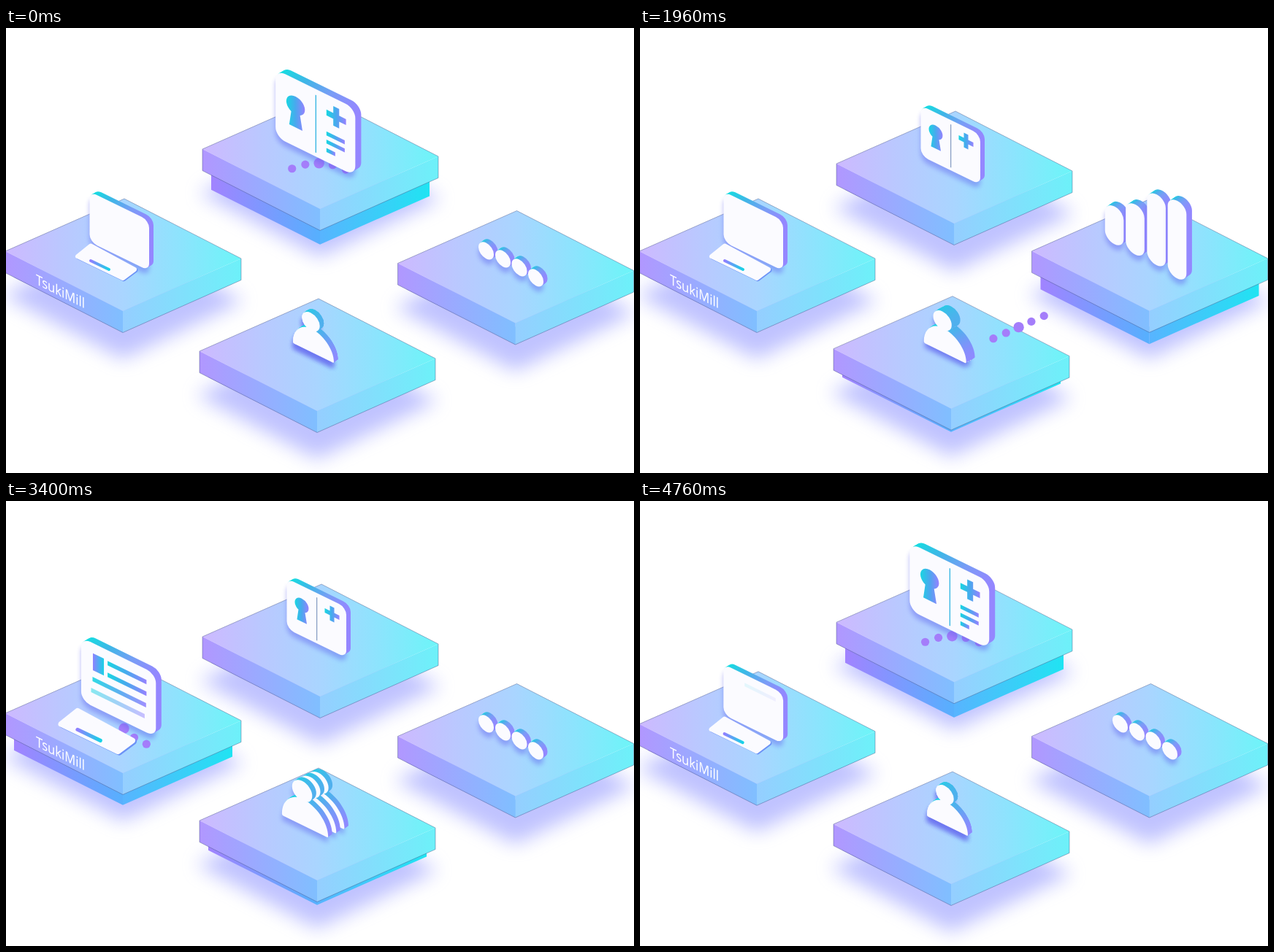
An HTML page that plays this animation: 860x610 px, repeating every 4800 ms.

```html
<!DOCTYPE html>
<html lang="en">
<head>
<meta charset="utf-8">
<title>Isometric data loop</title>
<style>
html, body { margin: 0; width: 100%; height: 100%; overflow: hidden; background: #fff; }
svg { display: block; width: 100%; height: 100%; }
text { font: 500 19.2px "Noto Sans", "Open Sans", sans-serif; fill: #fff; }
</style>
</head>
<body>
<svg viewBox="0 0 860 610">
  <defs id="defs">
    <filter id="haze" x="-30%" y="-40%" width="160%" height="180%"><feGaussianBlur stdDeviation="13"/></filter>
    <filter id="soft" x="-50%" y="-50%" width="200%" height="200%"><feGaussianBlur stdDeviation="3"/></filter>
  </defs>
  <g id="hazes"></g>
  <g id="scene"></g>
</svg>
<script>
const LOOP = 4800, STEP = 600, LIFT = 20, SHEAR = 0.49, WHITE = '#fbfbff';
const $ = id => document.getElementById(id);
const clamp = x => Math.max(0, Math.min(1, x));
const ease = x => (1 - Math.cos(Math.PI * clamp(x))) / 2;
const mix = (a, b, p) => a + (b - a) * p;

const gradients = {
  top: ['#cdb9ff', '#bac8ff', '#a9d5ff', '#8ce4fd', '#6cf5f8'],
  left: ['#b197ff', '#80bfff'],
  right: ['#95ceff', '#6df1f9'],
  lowLeft: ['#a183ff', '#56b0fe'],
  lowRight: ['#58b4ff', '#20e4f2'],
  edge: ['#10e2e0', '#3fb6e7', '#7a9cf6', '#9586ff'],
  figure: ['#10e2e0', '#2cc8e6', '#52aeee', '#9089ff'],
  icon: ['#18d6e2', '#4aa8ee', '#9582ff'],
  back: ['#8f80ff', '#18d2e6']
};
$('defs').innerHTML += Object.entries(gradients).map(([id, cols]) =>
  `<linearGradient id="${id}">` + cols.map((c, i) =>
    `<stop offset="${i / (cols.length - 1)}" stop-color="${c}"/>`).join('') + '</linearGradient>').join('');

// Each platform: front corner of its top face and the moment it starts to rise.
const pads = {
  card: { x: 430, y: 268, up: 4200 },
  bars: { x: 697.5, y: 404.5, up: 600 },
  team: { x: 426, y: 525, up: 1800 },
  laptop: { x: 160, y: 388, up: 3000 }
};
const since = (t, pad) => (t - pad.up + LOOP) % LOOP;
const ramp = u => u < 3 * STEP ? Math.min(STEP, u, 3 * STEP - u) : 0;

$('hazes').innerHTML = Object.values(pads).map(() =>
  '<path d="M-165-22 0-100 165-14 0 66Z" fill="#8c92ff" opacity=".55" filter="url(#haze)"/>').join('');
const hazes = [...$('hazes').children];

const face = (d, g) => `<path d="${d}Z" fill="url(#${g})"/>`;

function slab({ x, y }, p, label = '') {
  return `<g transform="translate(${x} ${y})">` +
    face('M-149-69 0 5V28.7L-149-46.2', 'lowLeft') +
    face('M150-61 0 5V28.7L150-37.6', 'lowRight') +
    `<g transform="translate(0 ${-LIFT * p})">` +
    face('M-161-82 2-154 162-72 0 0', 'top') +
    face('M-161-82 0 0V29.5L-161-52.5', 'left') +
    face('M162-72 0 0V29.5L162-42.5', 'right') +
    '<path d="M-161-82V-52.5L0 29.5 162-42.5V-72L2-154Z" fill="none" stroke="#3c4c80" stroke-width=".6" opacity=".7"/>' +
    label + '</g></g>';
}

const label = `<text transform="matrix(.86 .43 0 1 -119 -37)">TsukiMill</text>`;

const rounded = (x, y, w, h, r) =>
  `M${x + r} ${y}h${w - 2 * r}a${r} ${r} 0 0 1 ${r} ${r}v${h - 2 * r}a${r} ${r} 0 0 1 ${-r} ${r}` +
  `h${2 * r - w}a${r} ${r} 0 0 1 ${-r} ${-r}v${2 * r - h}a${r} ${r} 0 0 1 ${r} ${-r}Z`;

// A thick upright plate: shadow, extruded edge, white front and its details.
function plate(d, x, y, s, dx, dy, details = '', edge = 'edge') {
  const at = (ox, oy) => `transform="matrix(${s} ${s * SHEAR} 0 ${s} ${x + ox} ${y + oy})"`;
  let out = `<g filter="url(#soft)" opacity=".48"><path d="${d}" ${at(0, 7)} fill="#6468ee"/></g>`;
  for (let i = 7; i > 0; i--) out += `<path d="${d}" ${at(dx * i / 7, dy * i / 7)} fill="url(#${edge})"/>`;
  return out + `<g ${at(0, 0)}><path d="${d}" fill="${WHITE}"/>${details}</g>`;
}

const bar = (x, y, w, h, fill = 'icon', o = 1) =>
  w > 0 ? `<rect x="${x}" y="${y}" width="${w}" height="${h}" fill="url(#${fill})" opacity="${o}"/>` : '';

const screen = rounded(0, 0, 81.5, 69, 10);

function panel(x, y, p, details) {
  const s = 1 + 0.34 * p, fx = x + 45.2, fy = y + 86;
  return plate(screen, fx - 45.2 * s, fy - 86 * s - LIFT * p, s, 6 * s, -3.6 * s, details);
}

function card(p) {
  const lines = [[40, 18.7], [48.3, 18.7], [57, 9]].map(([y, w], k) =>
    bar(52, y - 2, w * clamp((p - 0.22 * k) / 0.36), 4)).join('');
  return panel(384.5, 106, p,
    '<path d="M16 35A9.5 9.2 0 1 1 25 35L27.5 49.3H14Z" fill="url(#icon)"/>' +
    `<rect x="40.7" y="6" width="1" height="59" fill="${p > 0.4 ? '#35b5e2' : '#6b86b4'}"/>` +
    '<path d="M59 8.6h6v7h7v6h-7v7h-6v-7h-7v-6h7Z" fill="url(#icon)"/>' + lines);
}

function laptop(t, p) {
  const u = since(t, pads.laptop), s = 1 + 0.34 * p;
  const inn = k => clamp((u - 100 - 70 * k) / 180);
  const show = k => Math.min(inn(k), 1 - clamp((u - 1600 + 60 * k) / 180));
  const row = (x, k) => bar(x - 4 * (1 - inn(k)), 11.6 + 12.7 * k, 71.2 - x, 4.8, 'icon', show(k));
  const details = u < 3 * STEP
    ? bar(12.8, 11, 12, 18.5, 'back', show(1)) + row(28.8, 0) + row(28.8, 1) + row(12.8, 2) + row(12.8, 3)
    : '';
  const e = u < 1200 ? ease((u - 80) / 560) : 1 - ease((u - 1400) / 400);
  const keys = 'M116 298.5 176 331 160 343 98 313Z';
  const x = 159.6 * (1 - s) - 11.3 * e, y = 310 * (1 - s) - LIFT * p + 11.5 * e;
  return panel(114.5, 224, p, details) +
    `<g transform="matrix(${s} 0 0 ${s} ${x} ${y})" stroke-linejoin="round" stroke-width="6">` +
    `<path d="${keys}" transform="translate(1.5 1.2)" fill="#6c92f6" stroke="#6c92f6"/>` +
    `<path d="${keys}" fill="${WHITE}" stroke="${WHITE}"/>` +
    '<path d="M116 319 141 331" stroke="url(#back)" stroke-width="4" stroke-linecap="round"/></g>';
}

const figure = 'M-28-1C-28-18-16-31-3-31C13-31 28-17 28-1Q28 1 26 1H-26Q-28 1-28-1Z' +
  'M-15.7-40.2A12.2 12.2 0 0 1 8.7-40.2A12.2 12.2 0 0 1-15.7-40.2Z';

function team(t, p) {
  // the figures spread a moment after the platform moves
  const q = ease(ramp(since(t, pads.team) - 40) / STEP);
  const x = mix(421, 387.5, q), y = mix(444.5, 446, q);
  return [2, 1, 0].map(i =>
    plate(figure, x + 32.5 * i * q, y - 16.5 * i * q, 1 + 0.38 * q, 5.5, -3.8, '', 'figure')).join('');
}

// x and bottom at rest and raised, growth, delay and duration of growth
const columns = [
  [657.5, 648, 317, 293, 30, 0, 380],
  [680.5, 677.5, 328, 308, 48, 0, 480],
  [703, 708, 340, 323, 84, 50, 490],
  [725.5, 737.5, 354, 342, 111, 100, 500]
];

function chart(m, p) {
  const r = mix(10.5, 13.3, p);
  return columns.map(([x0, x1, y0, y1, grow, wait, dur]) => {
    const h = Math.max(2 * r, 21.6 + grow * ease((m - wait) / dur));
    return plate(rounded(-r, -h, 2 * r, h, r), mix(x0, x1, p), mix(y0, y1, p) - 0.8, 1,
      mix(5.5, 8, p), mix(-4, -5.5, p));
  }).join('');
}

// The dots follow a rounded parallelogram, slowing down at each platform.
const corners = [[430, 175.5], [713, 323], [423, 453], [140, 306]];
const toward = ([ax, ay], [bx, by]) => {
  const k = 45 / Math.hypot(bx - ax, by - ay);
  return `${mix(ax, bx, k)} ${mix(ay, by, k)}`;
};
const track = document.createElementNS('http://www.w3.org/2000/svg', 'path');
track.setAttribute('d', corners.map((c, i) =>
  `${i ? 'L' : 'M'}${toward(c, corners[(i + 3) % 4])}Q${c} ${toward(c, corners[(i + 1) % 4])}`).join('') + 'Z');
const trackLen = track.getTotalLength();

const knots = [[0, 0], [560, 127], [760, 195], [1200, 300], [1960, 499], [2400, 600],
  [2880, 711], [3400, 896], [3600, 900], [4400, 1124], [4800, 1200]];
const slope = i => (knots[i + 1][1] - knots[i][1]) / (knots[i + 1][0] - knots[i][0]);
const tangent = i => {
  if (knots[i][0] % 1200 === 0) return 0;
  const a = slope(i - 1), b = slope(i);
  return 2 * a * b / (a + b);
};

function travel(t) {
  let i = 0;
  while (i < knots.length - 2 && t >= knots[i + 1][0]) i++;
  const [t0, s0] = knots[i], [t1, s1] = knots[i + 1];
  const h = t1 - t0, v = (t - t0) / h, w = v * v * (3 - 2 * v);
  return mix(s0, s1, w) + h * v * (1 - v) * (tangent(i) * (1 - v) - tangent(i + 1) * v);
}

function dots(t) {
  const mid = 41 + travel(t) * trackLen / 1200;
  return [-2, -1, 0, 1, 2].map(i => {
    const q = track.getPointAtLength((mid + 19 * i + trackLen) % trackLen);
    return `<circle cx="${q.x}" cy="${q.y}" r="${i ? 5.6 : 7.2}" fill="#a47dfa"/>`;
  }).join('');
}

function draw(t) {
  const m = {}, p = {};
  Object.entries(pads).forEach(([k, pad], i) => {
    m[k] = ramp(since(t, pad));
    p[k] = ease(m[k] / STEP);
    hazes[i].setAttribute('transform', `translate(${pad.x} ${pad.y - LIFT * p[k]})`);
  });
  $('scene').innerHTML =
    Object.keys(pads).map(k => slab(pads[k], p[k], k === 'laptop' ? label : '')).join('') +
    dots(t) + card(p.card) + chart(m.bars, p.bars) + laptop(t, p.laptop) + team(t, p.team);
}

const start = performance.now();
function tick() {
  draw((performance.now() - start) % LOOP);
  requestAnimationFrame(tick);
}
tick();
</script>
</body>
</html>
```
